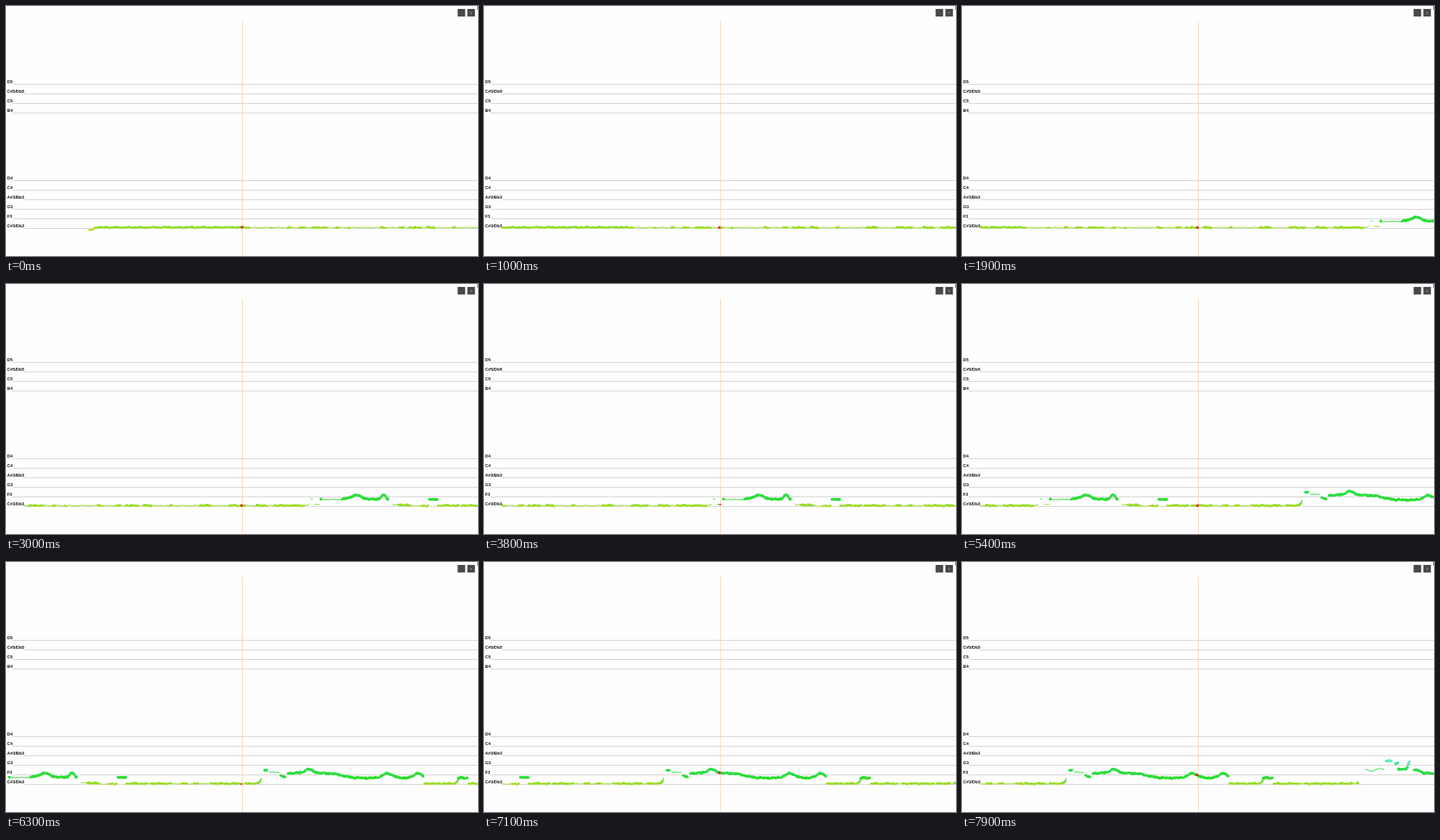
These frames come from a looping animation (640x340 px, 8000 ms). An HTML page:

```html
<!DOCTYPE html>
<html lang="en">
<head>
<meta charset="utf-8">
<title>Pitch track</title>
<style>
  html, body { margin: 0; width: 100%; height: 100%; overflow: hidden; background: #fefefe; }
  svg { display: block; width: 640px; height: 340px; }
  text { font: bold 5.8px "Liberation Sans", Arial, sans-serif; fill: #111; }
  .glyph { font-weight: normal; font-size: 5px; fill: #b5b5b5; text-anchor: middle; }
</style>
</head>
<body>
<svg viewBox="0 0 640 340">
  <g id="grid"></g>
  <rect x="320" y="20" width="1" height="320" fill="#f5d5bb"/>
  <g id="track"></g>
  <circle id="now" fill="#f01818"/>
  <g id="labels"></g>
  <g id="buttons"></g>
  <rect x="639" width="1" height="5" fill="#777"/>
</svg>
<script>
const LOOP = 8000, STEP = 100, SHIFT = 12.8, NOW_X = 319.5;
const LOW = 301.3, MID = 293.2, HIGH = 287;
const $ = id => document.getElementById(id);

function add(parent, tag, attrs, text) {
  const el = document.createElementNS("http://www.w3.org/2000/svg", tag);
  for (const key in attrs) el.setAttribute(key, attrs[key]);
  if (text) el.textContent = text;
  $(parent).appendChild(el);
}

// Note rows are evenly spaced, with a gap in the middle
const names = ["D5", "C#5/Db5", "C5", "B4", "D4", "C4", "A#3/Bb3", "G3", "F3", "C#3/Db3"];
names.forEach((name, i) => {
  const y = Math.round(106 + 13.07 * (i < 4 ? i : i + 6));
  add("grid", "rect", { x: 0, y, width: 640, height: 1, fill: "#d2d2d2" });
  add("labels", "rect", { x: 0, y: y - 7, width: name.length > 2 ? 24.5 : 9, height: 9, fill: "#fefefe" });
  add("labels", "text", { x: 1.5, y: y - 0.6 }, name);
});

[".", "x"].forEach((glyph, i) => {
  const x = 612.4 + i * 13.2;
  add("buttons", "rect", { x, y: 4, width: 10.2, height: 10.3, fill: "#484848" });
  add("buttons", "text", { class: "glyph", x: x + 5.1, y: 10.5 }, glyph);
});

const random = n => { const v = Math.sin(n * 127.1) * 43758.5; return v - Math.floor(v); };
const wobble = x => 0.35 * Math.sin(x * 0.37) + 0.3 * Math.sin(x * 0.81 + 1);
const bump = (x, mid, width) => Math.exp(-(((x - mid) / width) ** 2));
const fall = (x, mid, width) => 1 / (1 + Math.exp((x - mid) / width));

function smoothNoise(x) {
  const i = Math.floor(x), f = x - i;
  return random(i) + (random(i + 1) - random(i)) * f * f * (3 - 2 * f);
}

function colour(y) {
  const hue = y > MID ? 122 - (y - MID) * 5
            : y > 280 ? 122 + (MID - y) * 0.8
            : 132 + (280 - y) * 3.5;
  const light = 52 + Math.max(0, 278 - y) * 1.6;
  return `hsl(${hue.toFixed(0)},73%,${light.toFixed(0)}%)`;
}

// A thin line, beaded wherever the voice is loud enough
const samples = [];
function sing(from, to, loudness, pitch) {
  let prev;
  for (let x = from; x <= to; x += 1.5) {
    const p = { x, y: pitch(x) + wobble(x), loud: smoothNoise(x / 8) < loudness };
    const fill = colour(p.y);
    if (prev) add("track", "line", { x1: prev.x, y1: prev.y, x2: x, y2: p.y, stroke: fill, "stroke-width": 1.1 });
    if (p.loud) add("track", "circle", { cx: x, cy: p.y + random(x + 5) * 0.8 - 0.4,
      r: (p.y < MID + 2 ? 1.5 : 1.2) + random(x) * 0.7, fill });
    samples.push(p);
    prev = p;
  }
}

const hold = (from, to, loudness, y) => sing(from, to, loudness, () => y);
const lowNote = (from, to, loudness, lift) =>
  sing(from, to, loudness, x => LOW - lift * Math.exp((x - to) / 2));

sing(113, 330, 1, x => LOW - 0.3 + 4 * fall(x, 119, 1));
lowNote(330, 796, 0.45, 3);
hold(797, 801, 0, 292.3);
hold(802, 810, 0, 299.6);
sing(811, 840, 0.3, () => MID);
sing(840, 902, 1, x => MID - 0.5 - 5.5 * bump(x, 859, 10) - 6 * bump(x, 896, 4));
sing(908, 957, 0.55, x => LOW + 0.8 - 1.8 * fall(x, 930, 5) - 4 * bump(x, 958, 2));
hold(958, 969, 1, MID);
lowNote(970, 1085, 0.45, 0);
lowNote(1085, 1153, 0.85, 9);
hold(1157, 1160, 1, 283);
hold(1163, 1177, 0, 286);
sing(1179, 1186, 1, x => MID - 4 * fall(x, 1181, 1));
sing(1189, 1373, 1, x => MID + 0.4 - 6.5 * fall(x, 1262, 6)
  - 5 * bump(x, 1217, 8) - 6.2 * bump(x, 1324, 9) - 6.5 * bump(x, 1365, 7));
lowNote(1374, 1419, 0.8, 4);
hold(1420, 1432, 1, MID + 0.5);
lowNote(1434, 1549, 0.85, 2);
sing(1558, 1584, 0, x => 282.5 + 1.6 * Math.sin((x - 1560) / 4));
hold(1586, 1594, 1, 270.6);
hold(1599, 1602, 1, 273.5);
sing(1603, 1618, 1, x => 270 + 12 * fall(x, 1616, 0.8));
sing(1624, 1664, 1, x => 287.5 - 4.5 * fall(x, 1634, 1.5));

function draw(time) {
  const offset = Math.floor(time % LOOP / STEP) * SHIFT;
  const gap = p => Math.abs(p.x - offset - NOW_X);
  const nearest = samples.reduce((a, b) => gap(b) < gap(a) ? b : a);
  const now = $("now");
  $("track").setAttribute("transform", `translate(${-offset} 0)`);
  now.setAttribute("cx", nearest.x - offset);
  now.setAttribute("cy", nearest.y);
  now.setAttribute("r", gap(nearest) > 4 ? 0 : nearest.loud ? 1.8 : 1.2);
}

const start = performance.now();
function tick() {
  draw(performance.now() - start);
  requestAnimationFrame(tick);
}
tick();
</script>
</body>
</html>
```
